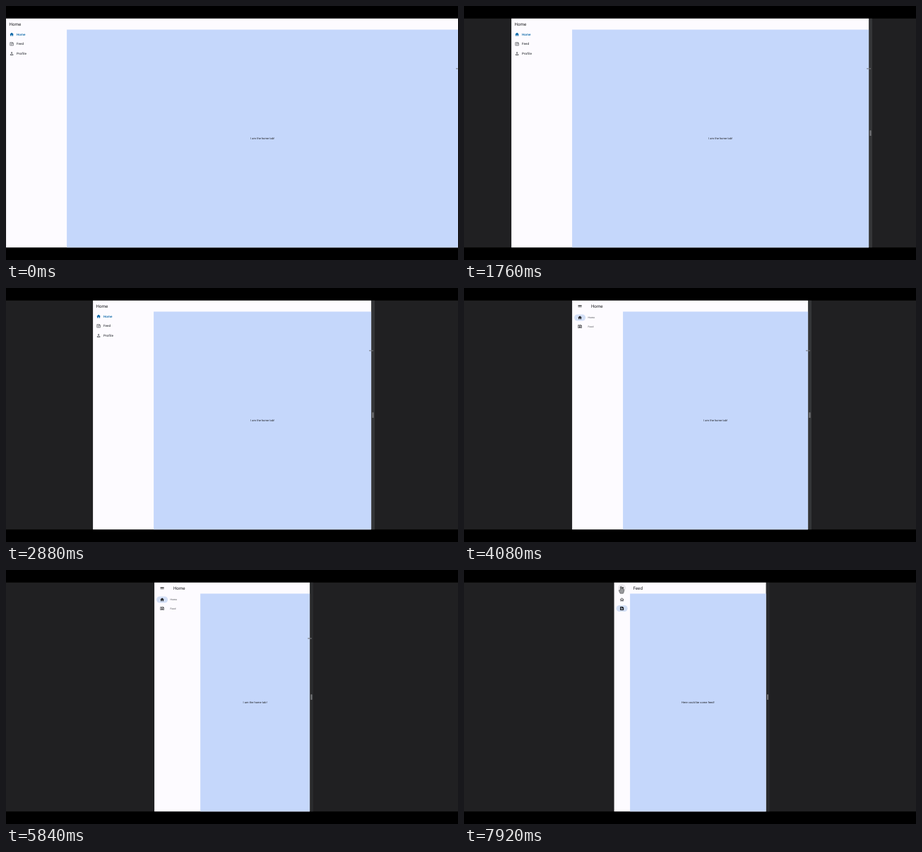
Write an HTML page with a canvas that moves like this. It is 640 px wide and 360 px high and loops after 8000 ms.

```html
<!DOCTYPE html>
<html lang="en">
<head>
<meta charset="utf-8">
<title>Adaptive navigation</title>
<style>
  html, body { margin: 0; width: 100%; height: 100%; overflow: hidden; background: #000; }
  canvas { display: block; width: 640px; height: 360px; }
</style>
</head>
<body>
<canvas id="stage"></canvas>
<script>
const LOOP = 8000, STEP = 80;
const TOP = 17.8, BOTTOM = 360 - TOP, CENTER = 320.1;
const ZOOM = 0.283; // stage pixels per app pixel
const INK = '#1b1c1f', MUTED = '#3f4247', BLUE = '#0061a4';
const PAGE = '#fdfbff', PANEL = '#c5d7fb', PILL = '#d3dff6';

const canvas = document.getElementById('stage');
const ctx = canvas.getContext('2d');
const ratio = window.devicePixelRatio || 1;
canvas.width = 640 * ratio;
canvas.height = 360 * ratio;

// Icons on a 24-unit grid
const feedLines = 'M7 17h10v-2H7zM12 7H7v2h5zM7 13h10v-2H7z';
const feedBody = 'M16 3H5c-1.1 0-2 .9-2 2v14c0 1.1.9 2 2 2h14c1.1 0 2-.9 2-2V8z';
const icons = {
  home: new Path2D('M10 20v-6h4v6h5v-8h3L12 3 2 12h3v8z'),
  homeOutline: new Path2D('M12 5.7l5 4.5V18h-2v-6H9v6H7v-7.8zM12 3L2 12h3v8h6v-6h2v6h6v-8h3z'),
  feed: new Path2D(feedBody + feedLines),
  feedOutline: new Path2D(feedBody + 'M19 19H5V5h10v4h4z' + feedLines),
  person: new Path2D('M12 6a2 2 0 1 1 0 4 2 2 0 0 1 0-4M12 15c3 0 6 1.5 6 2v1H6v-1c0-.5 3-2 6-2' +
    'M12 4a4 4 0 1 0 0 8 4 4 0 0 0 0-8M12 13c-2.7 0-8 1.3-8 4v3h16v-3c0-2.7-5.3-4-8-4z'),
  menu: new Path2D('M3 18h18v-2H3zM3 13h18v-2H3zM3 8h18V6H3z')
};
const hand = new Path2D('M-1.6 .2V-4a.9 .9 0 0 1 1.8 0v2.3l2.7 .6q.9 .2 .8 1.2L3.2 3.2 2.4 5h-4.2L-3.6 1.4q-.4-1.2 .7-1z');
const arrow = new Path2D('M-2-4v8l1.9-1.8 1.2 2.7 1.3-.6L1.2 1.7h2.5z');
const resize = new Path2D('M-3.2 0l1.6-1.1v.7h3.2v-.7L3.2 0 1.6 1.1V.4h-3.2v.7z');

// Window width while its edge is dragged in, rested and dragged again
const drag = [[560, 640], [1280, 557], [2240, 455], [2880, 394], [3200, 334],
  [4800, 334], [5040, 300], [5840, 220], [6160, 215]];

const mix = (a, b, p) => a + (b - a) * p;
const progress = (t, from, to) => Math.min(1, Math.max(0, (t - from) / (to - from)));
const smooth = p => p * p * (3 - 2 * p);

function windowWidth(t) {
  return drag.reduce((width, [time, next], i) =>
    i ? mix(width, next, progress(t, drag[i - 1][0], time)) : next, 0);
}

function rect(x, y, w, h, color, radius = 0) {
  ctx.fillStyle = color;
  ctx.beginPath();
  ctx.roundRect(x, y, w, h, radius);
  ctx.fill();
}

function zoomed(x, y, paint) {
  ctx.save();
  ctx.translate(x, y);
  ctx.scale(ZOOM, ZOOM);
  paint();
  ctx.restore();
}

function text(str, x, y, size, { color = INK, weight = 400, align = 'left', spacing = 0.25 } = {}) {
  zoomed(x, y, () => {
    ctx.font = `${weight} ${size}px Roboto, sans-serif`;
    ctx.textRendering = 'geometricPrecision';
    ctx.letterSpacing = spacing + 'px';
    ctx.textAlign = align;
    ctx.fillStyle = color;
    ctx.fillText(str, 0, size * 0.355);
  });
}

function icon(name, x, y, color = INK) {
  zoomed(x, y, () => {
    ctx.translate(-12, -12);
    ctx.fillStyle = color;
    ctx.fill(icons[name], 'evenodd');
  });
}

function drawer(left) {
  const items = [['home', 'Home', BLUE], ['feedOutline', 'Feed', MUTED], ['person', 'Profile', MUTED]];
  items.forEach(([name, label, color], i) => {
    const y = 40.2 + i * 13.6;
    icon(name, left + 8, y, color);
    text(label, left + 14.8, y, 16, { color, weight: 500, spacing: 0.35 });
  });
}

function rail(left, t, onFeed) {
  const x = left + 11, homeY = 42, feedY = 54.5;
  icon('menu', x, 25.6);
  rect(x - 8, (onFeed ? feedY : homeY) - 4.5, 16, 9, PILL, 4.5);
  icon(onFeed ? 'homeOutline' : 'home', x, homeY);
  icon(onFeed ? 'feed' : 'feedOutline', x, feedY);
  ctx.globalAlpha = 1 - progress(t, 5840, 6000);
  text('Home', left + 22.5, homeY, 12, { color: MUTED, spacing: 0.5 });
  text('Feed', left + 22.5, feedY, 12, { color: MUTED, spacing: 0.5 });
  ctx.globalAlpha = 1;
  if (t >= 7520) rect(x - 5.6, 19.9, 11.2, 11.2, 'rgba(27,28,31,.08)', 5.6);
}

// Follows the dragged edge, then goes to the feed item and up to the menu
function pointer(t, right) {
  const toFeed = smooth(progress(t, 6320, 7120));
  const toMenu = smooth(progress(t, 7200, 7680));
  const dragY = mix(88.8, 97, progress(t, 4960, 5840));
  const x = mix(mix(right, 225, toFeed), 223, toMenu);
  const y = mix(mix(dragY, 51, toFeed), 28.2, toMenu);
  const shape = t < 6400 ? resize : x > 235 ? arrow : hand;
  ctx.save();
  ctx.translate(x, y);
  ctx.fillStyle = shape === resize ? '#77797d' : '#98999c';
  ctx.fill(shape);
  if (shape !== resize) {
    ctx.lineWidth = 0.6;
    ctx.strokeStyle = '#4c4d50';
    ctx.stroke(shape);
  }
  ctx.restore();
}

function draw(t) {
  const width = windowWidth(t), height = BOTTOM - TOP;
  const left = CENTER - width / 2, right = CENTER + width / 2;
  const wide = t < 3280, onFeed = t >= 6960;
  const navWidth = wide ? 86 : mix(72, 22.5, smooth(progress(t, 5760, 6100)));
  const panel = left + navWidth;

  ctx.setTransform(ratio, 0, 0, ratio, 0, 0);
  rect(0, 0, 640, 360, '#000');
  rect(0, TOP, 640, height, '#202022');
  rect(right, TOP, 5, height, t < 4880 ? '#343537' : '#292a2c');
  rect(right + 1.4, 176.3, 2, 7.6, '#77787b', 0.5);
  rect(left, TOP, width, height, PAGE);
  rect(panel, 33.6, right - panel, BOTTOM - 33.6, PANEL);

  text(onFeed ? 'Feed' : 'Home', left + (wide ? 4.4 : 26.8), 25.6, 22, { spacing: 0 });
  if (wide) drawer(left);
  else rail(left, t, onFeed);
  text(onFeed ? 'Here could be some feed!' : 'I am the home tab!',
    (panel + right) / 2, 187.7, 14, { align: 'center' });
  pointer(t, right);
}

const start = performance.now();
function tick() {
  const t = (performance.now() - start) % LOOP;
  draw(Math.floor(t / STEP) * STEP);
  requestAnimationFrame(tick);
}
tick();
</script>
</body>
</html>
```
